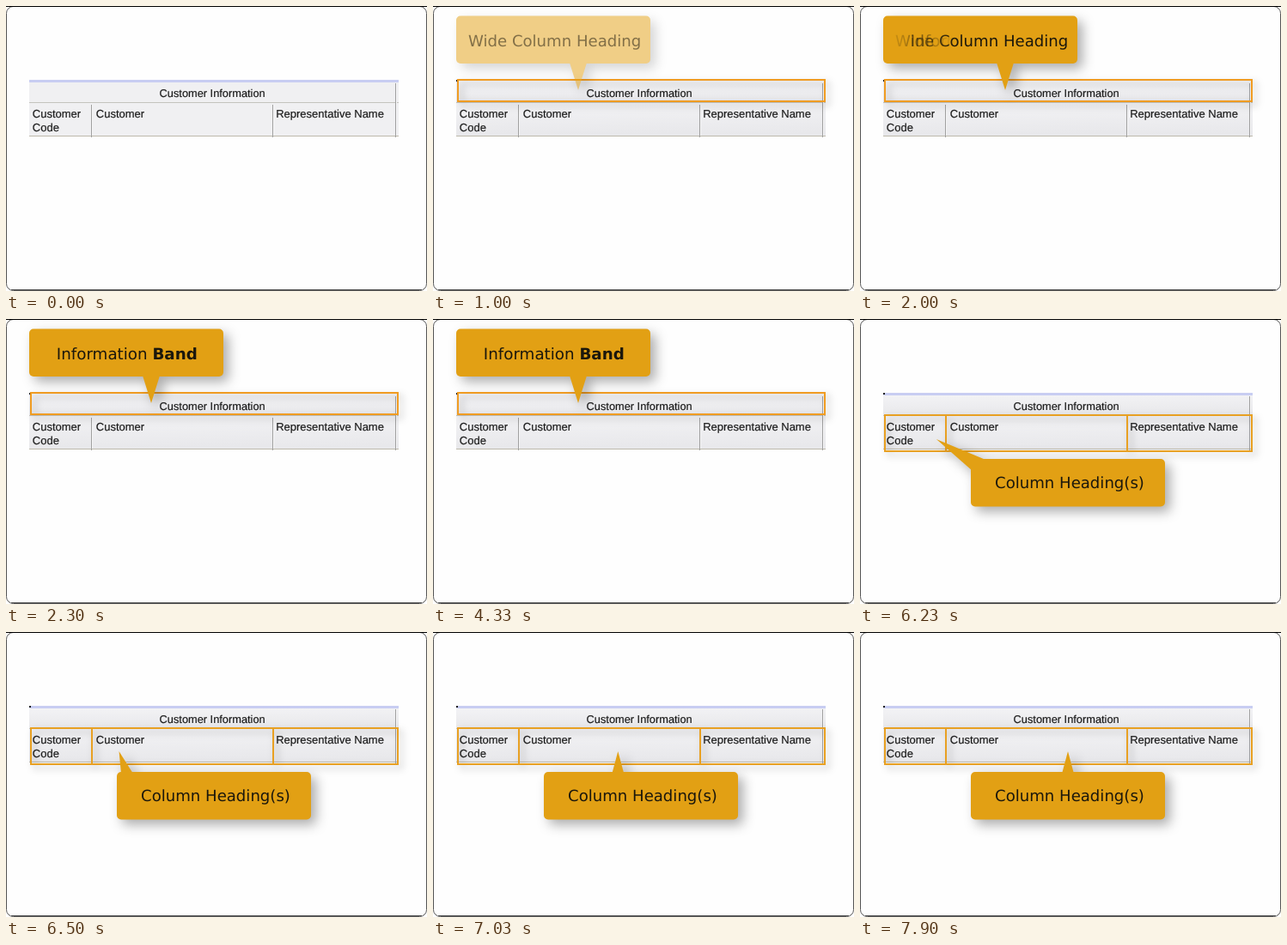
An HTML page that plays this animation: 490x332 px, repeating every 8 s.

```html
<!DOCTYPE html>
<html lang="en">
<head>
<meta charset="utf-8">
<title>Band and column headings</title>
<style>
  @property --edge { syntax: "<length>"; inherits: false; initial-value: 0px; }

  html, body { margin: 0; width: 100%; height: 100%; overflow: hidden; background: #fff; }
  #stage { position: relative; width: 490px; height: 332px; overflow: hidden; }
  svg { display: block; }

  /* One shared 8 s clock: 1% = 80 ms */
  .anim { animation: 8s linear infinite both; }

  .cells text {
    font: 13px "Liberation Sans", Arial, sans-serif;
    fill: #1c1c1c; stroke: #1c1c1c; stroke-width: .2;
    text-rendering: geometricPrecision;
  }
  .callout { fill: #e2a014; filter: drop-shadow(6px 6px 7px rgba(0, 0, 0, .32)); }
  .outline { fill: none; stroke-width: 2; filter: drop-shadow(4px 4px 4px rgba(0, 0, 0, .28)); }

  .label {
    position: absolute; width: 226px; height: 56px;
    font: 18.1px/56px "DejaVu Sans", Verdana, sans-serif;
    color: #1b170c; white-space: nowrap;
    text-rendering: geometricPrecision;
  }
  .label span { position: absolute; }
  .wipe-out {
    -webkit-mask-image: linear-gradient(90deg, transparent calc(var(--edge) - 80px), #000 var(--edge));
    mask-image: linear-gradient(90deg, transparent calc(var(--edge) - 80px), #000 var(--edge));
  }
  .wipe-in {
    -webkit-mask-image: linear-gradient(90deg, #000 calc(var(--edge) - 80px), transparent var(--edge));
    mask-image: linear-gradient(90deg, #000 calc(var(--edge) - 80px), transparent var(--edge));
  }

  .shade { animation-name: shade; }
  #bandBox { animation-name: band-box; }
  .first { animation-name: first; }
  .second { animation-name: second; }
  #wedge { animation-name: wedge; }
  .swap { animation-name: swap; }
  .reveal { animation-name: reveal; }

  @keyframes shade {
    0%, 1.3% { opacity: 0; }
    7%, 100% { opacity: 1; }
  }
  @keyframes band-box {
    0%, 1.3% { opacity: 0; }
    7%, 66.6% { opacity: 1; }
    66.62%, 100% { opacity: 0; }
  }
  @keyframes first {
    0%, 12.48% { opacity: 0; }
    12.5% { opacity: .5; }
    12.87%, 66.6% { opacity: 1; }
    66.62%, 100% { opacity: 0; }
  }
  @keyframes second {
    0%, 66.6% { opacity: 0; }
    66.62%, 100% { opacity: 1; }
  }
  @keyframes wedge {
    0%, 77.5% { d: path("M129 177L84 140L146 164L146 177Z"); }
    81% { d: path("M134 165L128.2 139L148 165L148 177Z"); }
    82% { d: path("M134 165L140.9 139L148 165L148 177Z"); }
    90%, 100% { d: path("M235 165L242 139L249 165L249 177Z"); }
  }
  @keyframes swap {
    0%, 24.4% { --edge: 13px; }
    25% { --edge: 83px; }
    28.75%, 100% { --edge: 306px; }
  }
  @keyframes reveal {
    0%, 66.62% { --edge: 22px; }
    70.75%, 100% { --edge: 306px; }
  }
</style>
</head>
<body>
<div id="stage">
  <svg width="490" height="332" viewBox="0 0 490 332">
    <defs>
      <linearGradient id="cellFill" x2=".12" y2="1">
        <stop offset="0" stop-color="#f3f3f5"/>
        <stop offset="1" stop-color="#e8e8eb"/>
      </linearGradient>
    </defs>

    <rect x=".5" y=".5" width="489" height="331" rx="8" fill="#fefefe" stroke="#555"/>
    <path d="M0 .5H490" stroke="#000"/>
    <path d="M6 330.5H484" stroke="#555"/>

    <g class="cells">
      <rect x="27" y="86" width="430" height="66" fill="#f0f0f2"/>
      <g class="anim shade" fill="url(#cellFill)">
        <rect x="27" y="89" width="430" height="23"/>
        <rect x="27" y="113" width="73" height="38"/>
        <rect x="101" y="113" width="209" height="38"/>
        <rect x="311" y="113" width="146" height="38"/>
      </g>
      <rect x="27" y="86" width="430" height="3" fill="#c8cdf2"/>
      <path d="M27 112.5H457" stroke="#c4c3bd"/>
      <path d="M27 151.5H457" stroke="#bdb9ab"/>
      <path d="M99.5 115V153M310.5 115V153M453.5 90V153" stroke="#a0a0a0"/>
      <path d="M100.5 115V151M311.5 115V151M454.5 90V151" stroke="#f6f6f7"/>
      <text x="178.6" y="106.3" font-size="12.8" style="font-size:12.8px">Customer Information</text>
      <text x="30.8" y="129.5">Customer</text>
      <text x="30.8" y="145.6">Code</text>
      <text x="104.8" y="129.5">Customer</text>
      <text x="314.2" y="129.5">Representative Name</text>
    </g>
    <rect class="anim shade" x="27" y="86" width="2" height="2" fill="#222"/>

    <g id="bandBox" class="anim">
      <rect x="29" y="86" width="427" height="4" fill="#f3f3f5"/>
      <rect class="outline" x="29" y="86" width="427" height="25" stroke="#f09c22"/>
    </g>
    <g class="anim first">
      <g class="callout">
        <path d="M159 66L169 98L179 66Z"/>
        <rect x="27" y="11.5" width="226" height="55.5" rx="5"/>
      </g>
    </g>

    <g class="anim second">
      <path class="outline" d="M29 112H456V154H29ZM100 112V154M311 112V154" stroke="#e8a022"/>
      <g class="callout">
        <path id="wedge" class="anim" d="M129 177L84 140L146 164L146 177Z"/>
        <rect x="129" y="163" width="226" height="55.5" rx="5"/>
      </g>
    </g>
  </svg>

  <div class="anim first">
    <div class="label anim wipe-out swap" style="left:27px;top:14px">
      <span style="left:14px">Wide Column Heading</span>
    </div>
    <div class="label anim wipe-in swap" style="left:27px;top:14px">
      <span style="left:31.8px;font-size:18.3px">Information <b>Band</b></span>
    </div>
  </div>
  <div class="anim second">
    <div class="label anim wipe-in reveal" style="left:129px;top:164px">
      <span style="left:28px">Column Heading(s)</span>
    </div>
  </div>
</div>
</body>
</html>
```
